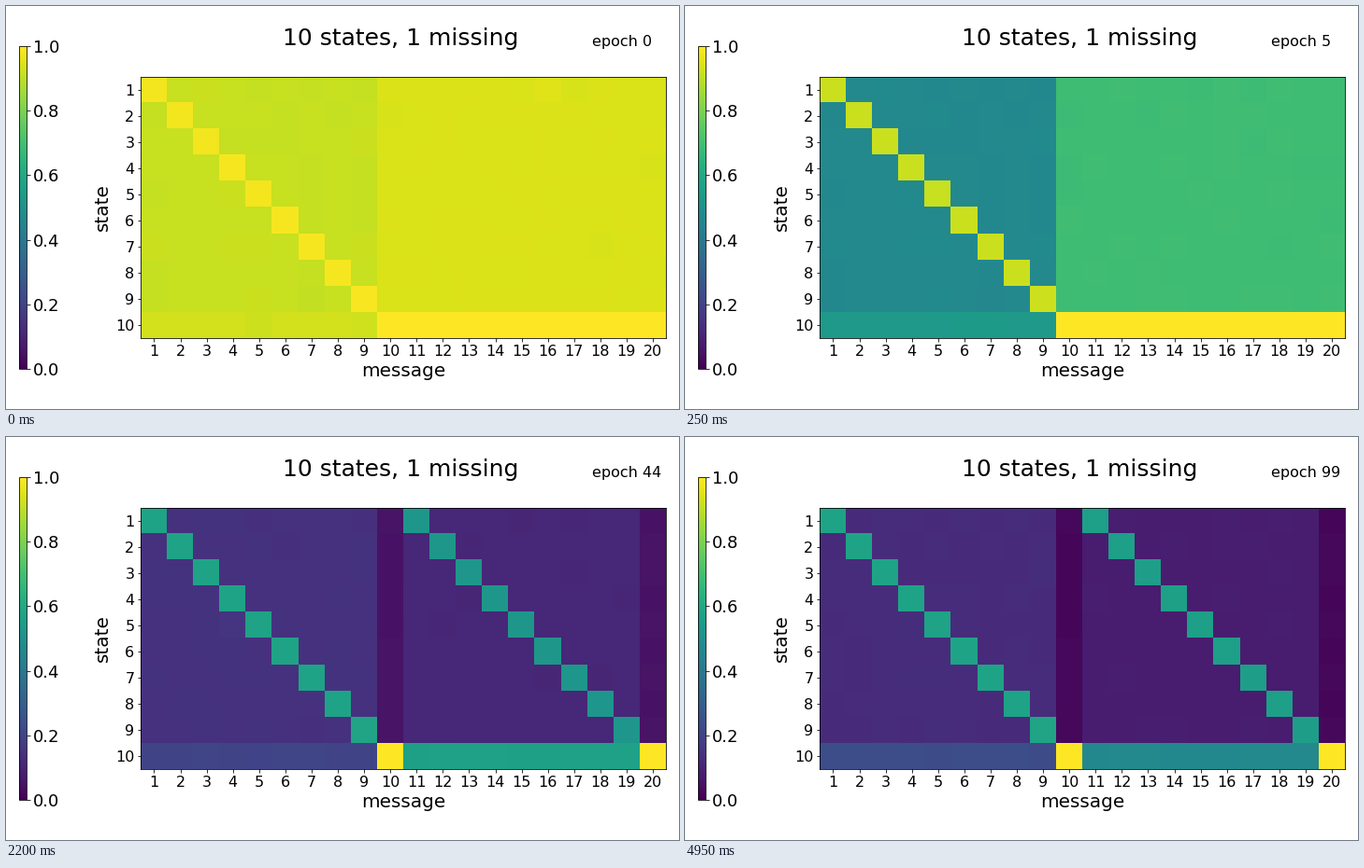
A matplotlib script that plays this animation: 720 px wide and 432 px high, repeating every 5 s.

```python
import numpy as np
import matplotlib.pyplot as plt
from matplotlib.animation import FuncAnimation

plt.rcParams["font.family"] = "DejaVu Sans"

STATES, MESSAGES, EPOCHS = 10, 20, 100
SWITCH_START, SWITCH_END = 26, 29

rng = np.random.default_rng(4)
jitter = rng.normal(0, .002, (STATES, MESSAGES))


def ramp(t, start, end):
    """Smooth step from 0 to 1."""
    u = np.clip((t - start) / (end - start), 0, 1)
    return u * u * (3 - 2 * u)


def learn(t, start, end, tau):
    """Early fall that begins gently and levels off."""
    return end + (start - end) * np.exp(-(t / tau) ** 1.3)


def settle(t, start, end, tau=30):
    """Slow drift after the switch."""
    return end + (start - end) * np.exp(-max(t - SWITCH_END, 0) / tau)


def matrix(t):
    switch = ramp(t, SWITCH_START, SWITCH_END)
    bloom = ramp(t, 22, SWITCH_START)

    def mix(early, late):
        return early + (late - early) * switch

    new = learn(t, .945, .43, 6.7)
    rows = np.arange(STATES - 1)
    m = np.empty((STATES, MESSAGES))

    # known messages
    m[:9, :9] = mix(learn(t, .915, .2, 5.1), settle(t, .19, .125, 12))
    m[rows, rows] = mix(learn(t, .985, .79, 10), .58)
    m[9, :9] = mix(learn(t, .93, .145, 6.7), settle(t, .185, .24))

    # new messages
    m[:9, 9:] = mix(new, settle(t, .19, .08, 12))
    m[:9, 9::10] = mix(new, settle(t, .13, .02, 12))
    m[rows, rows + 10] = mix(new + .095 * bloom, settle(t, .5, .57))
    m[9, 10:19] = mix(1 - .1 * bloom, settle(t, .65, .45))

    m += jitter
    m[9, 9::10] = 1
    if bloom == 0:
        m[9, 9:] = 1
    return np.clip(m, 0, 1)


fig = plt.figure(figsize=(10, 6), dpi=72, facecolor="white")
ax = fig.add_axes([.2006, .1, .78, .8])
image = ax.imshow(matrix(0), cmap="viridis", vmin=0, vmax=1,
                  interpolation="nearest")
ax.set_xticks(range(MESSAGES), range(1, MESSAGES + 1), fontsize=16)
ax.set_yticks(range(STATES), range(1, STATES + 1), fontsize=16)
ax.set_xlabel("message", fontsize=20)
ax.set_ylabel("state", fontsize=20)

bar = fig.colorbar(image, cax=fig.add_axes([.02, .1, .011, .8]))
bar.ax.tick_params(labelsize=18)

fig.text(.586, .902, "10 states, 1 missing", fontsize=25, ha="center")
counter = fig.text(.871, .9, "epoch 0", fontsize=16)


def update(epoch):
    image.set_data(matrix(epoch))
    counter.set_text(f"epoch {epoch}")
    return image, counter


anim = FuncAnimation(fig, update, frames=EPOCHS, interval=50,
                     repeat=True, repeat_delay=0)
plt.show()
```
